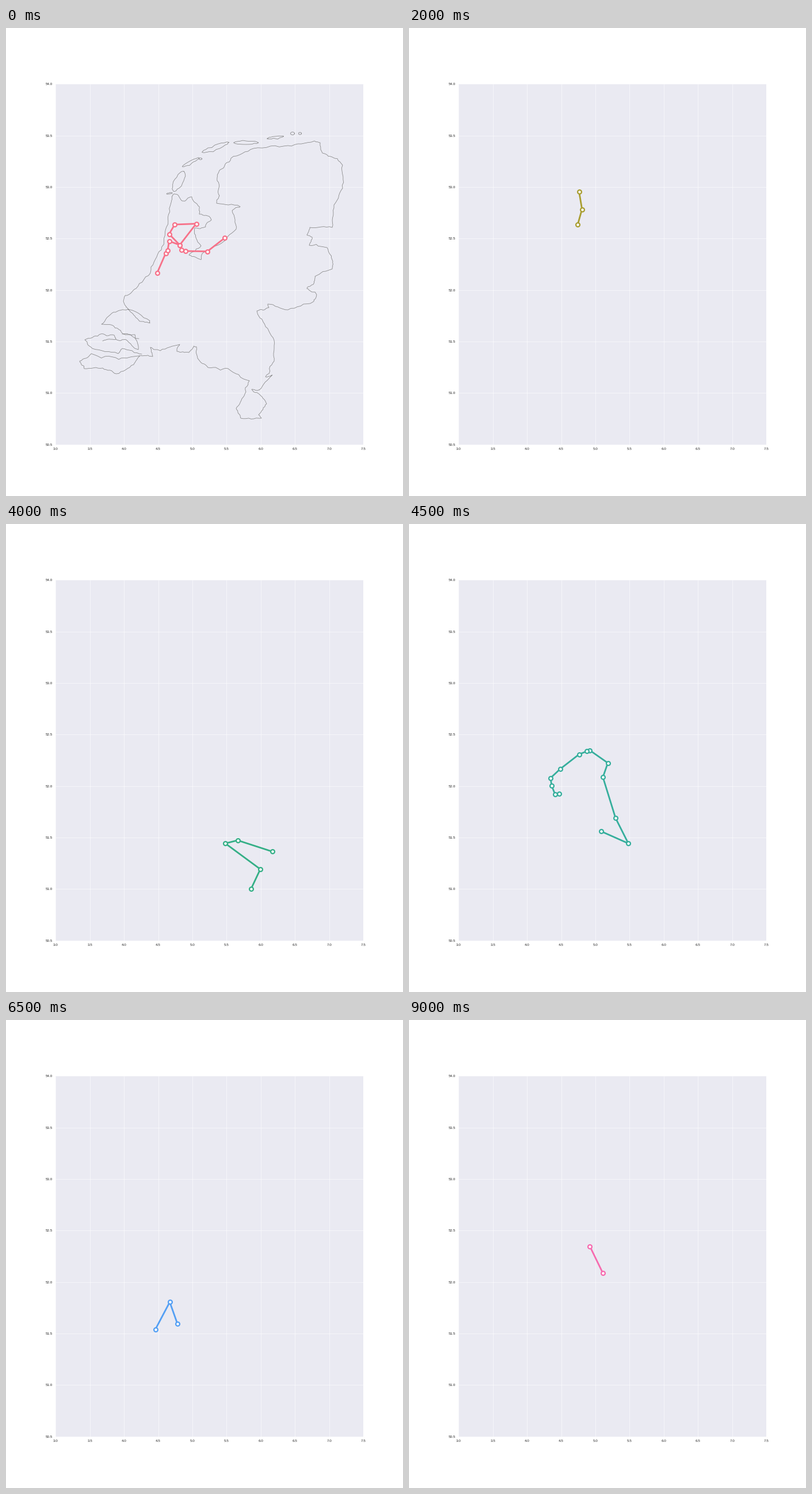
A matplotlib script that plays this animation: 690x812 px, repeating every 9500 ms.

```python
import math
import numpy as np
import matplotlib.pyplot as plt
from matplotlib.animation import FuncAnimation

W, H, DPI = 690, 812, 40
PX = 72 / DPI  # points per pixel

plt.rcParams["font.family"] = "Liberation Sans"

# Stations by region, in stage pixels; "wa" is the first one of the west
REGIONS = {
    "n": [(510.4, 238.8), (510.8, 277.8), (418, 241), (432.6, 283),
          (466.2, 331.2), (453.7, 364.6), (295.6, 284.1), (300.7, 314.5)],
    "e": [(549, 415), (537, 408), (520.5, 390.7), (462, 409), (466, 428.9),
          (439, 417), (368.5, 427.4), (431, 457.6), (425.4, 483),
          (387.4, 496.6)],
    "s": [(407.8, 660), (426, 632.9), (440, 652.9), (442, 598.9),
          (463, 568.4), (402.6, 548.8), (381.2, 554.2), (359, 510.2),
          (334.1, 533.3), (298, 527.2), (280.6, 531), (259.5, 537),
          (157.3, 553.8), (284.6, 489.4)],
    "w": [(262.5, 425.3), (277.5, 391), (281, 385.5), (283.5, 369.8),
          (302, 376.5), (283.5, 357.5), (293.2, 341), (330.5, 339.6),
          (305, 385.4), (312.3, 387), (350, 387.6), (380, 364.4)],
    "c": [(337, 439.3), (345.6, 414.6), (314.4, 392.8), (309, 394.4),
          (295.6, 399.6), (246.1, 440.6), (247.8, 453.8), (253.9, 469),
          (261.3, 468.2), (289, 451.5), (243.6, 440.5), (283.5, 432.6)],
}
ROUTES = [
    "wa wb wc wd we wf wg wh we wi wj wk wl",
    "eh ca eg nf ed ec eb ea",
    "sm sl sk sj si sh ej ei eh",
    "nb na nc nd ne nf ec",
    "ng nh wg",
    "eg ef",
    "nb nf ed ee",
    "sa sb sc",
    "se sf sg sd sb",
    "si sg sh ca cb cc cd ce wa cf cg ch ci",
    "sn ci cj cf",
    "wc wi cd",
    "wd wf",
    "sl sn sj",
    "ch ci",
    "cg ck wa ce ca",
    "ck cj cl",
    "ck cj ca cb wk",
    "cc ca",
]

# Corner points of the shores and borders; rough() adds the detail
MAINLAND = [
    (209, 484), (204, 474), (207, 464), (226, 452), (252, 420), (270, 385),
    (279, 345), (287, 303), (290, 289), (299, 290), (306, 300), (323, 293),
    (336, 310), (336, 323), (351, 326), (357, 333), (347, 345), (328, 347),
    (333, 371), (339, 378), (318, 394), (339, 402), (341, 391), (370, 376),
    (400, 349), (393, 317), (407, 310), (366, 304), (371, 291), (367, 265),
    (372, 246), (391, 226), (430, 209), (490, 204), (536, 196), (546, 199),
    (550, 217), (571, 226), (585, 238), (585, 278), (570, 312), (567, 346),
    (528, 346), (523, 359), (532, 363), (527, 377), (558, 381), (568, 405),
    (567, 418), (537, 431), (535, 443), (523, 452), (540, 463), (534, 475),
    (490, 489), (455, 479), (457, 485), (436, 491), (447, 510), (466, 542),
    (466, 578), (451, 605), (463, 602), (440, 628)]
SOUTH = [
    (440, 628), (427, 627), (444, 639), (453, 652), (439, 671), (444, 677),
    (408, 677), (400, 660), (414, 638), (423, 612), (386, 591), (351, 589),
    (333, 573), (331, 553), (326, 552), (318, 563), (297, 561), (302, 549),
    (268, 560), (251, 554), (255, 570), (232, 569)]
DELTA = [
    [(212, 488), (187, 493), (166, 514), (187, 517), (200, 527), (231, 539)],
    [(209, 484), (250, 508), (250, 512), (228, 504), (212, 488)],
    [(236, 566), (202, 556), (195, 565), (150, 556), (137, 541), (162, 532),
     (188, 533), (191, 540), (168, 543)],
    [(191, 540), (209, 541), (230, 558), (224, 532), (202, 531)],
    [(232, 569), (196, 575), (148, 565), (128, 578), (136, 591), (168, 590),
     (192, 600), (222, 584), (232, 569)],
]
# Centre, length, width and tilt
ISLANDS = [
    (300, 266, 39, 15, -62), (321, 233, 33, 5, -28), (364, 207, 50, 8, -20),
    (417, 199, 43, 6, 0), (468, 190, 29, 4, -8), (338, 227, 5, 3, 0),
    (284, 287, 10, 2, -9), (498, 183, 7, 5, 0), (511, 183, 5, 4, 0),
]


def station(code):
    return REGIONS[code[0]][ord(code[1]) - ord("a")]


def husl(hue, sat=89.1, light=64.35):
    """HUSL colour as an RGB tuple."""
    m = np.array([[3.24097, -1.537383, -0.498611],
                  [-0.969244, 1.875968, 0.041555],
                  [0.05563, -0.203977, 1.056972]])
    a = math.radians(hue)
    s = (light + 16) ** 3 / 1560896
    reach = []
    for m1, m2, m3 in m:
        for t in (0, 1):
            low = (632260 * m3 - 126452 * m2) * s + 126452 * t
            slope = (284517 * m1 - 94839 * m3) * s / low
            rise = ((838422 * m3 + 769860 * m2 + 731718 * m1) * s
                    - 769860 * t) * light / low
            reach.append(rise / (math.sin(a) - slope * math.cos(a)))
    chroma = min(r for r in reach if r > 0) * sat / 100
    u = chroma * math.cos(a) / (13 * light) + 0.19783
    v = chroma * math.sin(a) / (13 * light) + 0.46832
    y = ((light + 16) / 116) ** 3
    x = 9 * y * u / (4 * v)
    z = (9 * y - 15 * v * y - v * x) / (3 * v)
    lin = np.clip(m @ [x, y, z], 0.0032, 1)
    return tuple(1.055 * lin ** (1 / 2.4) - 0.055)


def rough(points, rng, rounds=3):
    """Break each segment at a nudged midpoint to give a ragged shore."""
    pts = np.array(points, float)
    for _ in range(rounds):
        step = np.diff(pts, axis=0)
        size = np.maximum(np.hypot(*step.T), 0.01)
        nudge = rng.normal(0, 1, len(step)) * np.minimum(size * 0.09, 1.1)
        normal = step[:, ::-1] * [-1, 1] / size[:, None]
        out = np.empty((2 * len(pts) - 1, 2))
        out[::2] = pts
        out[1::2] = pts[:-1] + step / 2 + normal * nudge[:, None]
        pts = out
    return pts


def island(cx, cy, length, width, tilt):
    t = np.linspace(0, 2 * np.pi, 13)
    x, y = length / 2 * np.cos(t), width / 2 * np.sin(t)
    c, s = math.cos(math.radians(tilt)), math.sin(math.radians(tilt))
    return np.column_stack([cx + c * x - s * y, cy + s * x + c * y])


fig, ax = plt.subplots(figsize=(W / DPI, H / DPI), dpi=DPI, facecolor="white")
fig.subplots_adjust(left=0.125, right=0.9, bottom=0.11, top=0.88)
ax.set(xlim=(3, 7.5), ylim=(50.5, 54), facecolor="#eaeaf2", axisbelow=True,
       xticks=np.arange(3, 7.6, 0.5), yticks=np.arange(50.5, 54.1, 0.5))
ax.xaxis.set_major_formatter("{x:.1f}")
ax.yaxis.set_major_formatter("{x:.1f}")
ax.grid(color="white", lw=0.56 * PX)
ax.tick_params(length=0, pad=5.4 * PX, labelsize=6.2 * PX, labelcolor="0.15")
for spine in ax.spines.values():
    spine.set_visible(False)

# Overlay in stage pixels
stage = fig.add_axes([0, 0, 1, 1])
stage.set(xlim=(0, W), ylim=(H, 0))
stage.axis("off")

rng = np.random.default_rng(4)
shores = [rough(s, rng) for s in [MAINLAND, SOUTH, *DELTA]]
shores += [rough(island(*i), rng, 1) for i in ISLANDS]
outline = [stage.plot(*s.T, color="0.5", lw=0.75 * PX)[0] for s in shores]

route, = stage.plot([], [], "o-", lw=2.8 * PX, ms=6.8 * PX, mew=2.25 * PX,
                    mfc="white", solid_joinstyle="round")
COUNT = len(ROUTES)
COLORS = [husl((i / COUNT + 0.01) * 359) for i in range(COUNT)]


def draw(i):
    for line in outline:
        line.set_visible(i == 0)
    route.set_data(*zip(*map(station, ROUTES[i].split())))
    route.set_color(COLORS[i])
    route.set_markeredgecolor(COLORS[i])
    return [route, *outline]


anim = FuncAnimation(fig, draw, frames=COUNT, interval=500, repeat=True)
plt.show()
```
